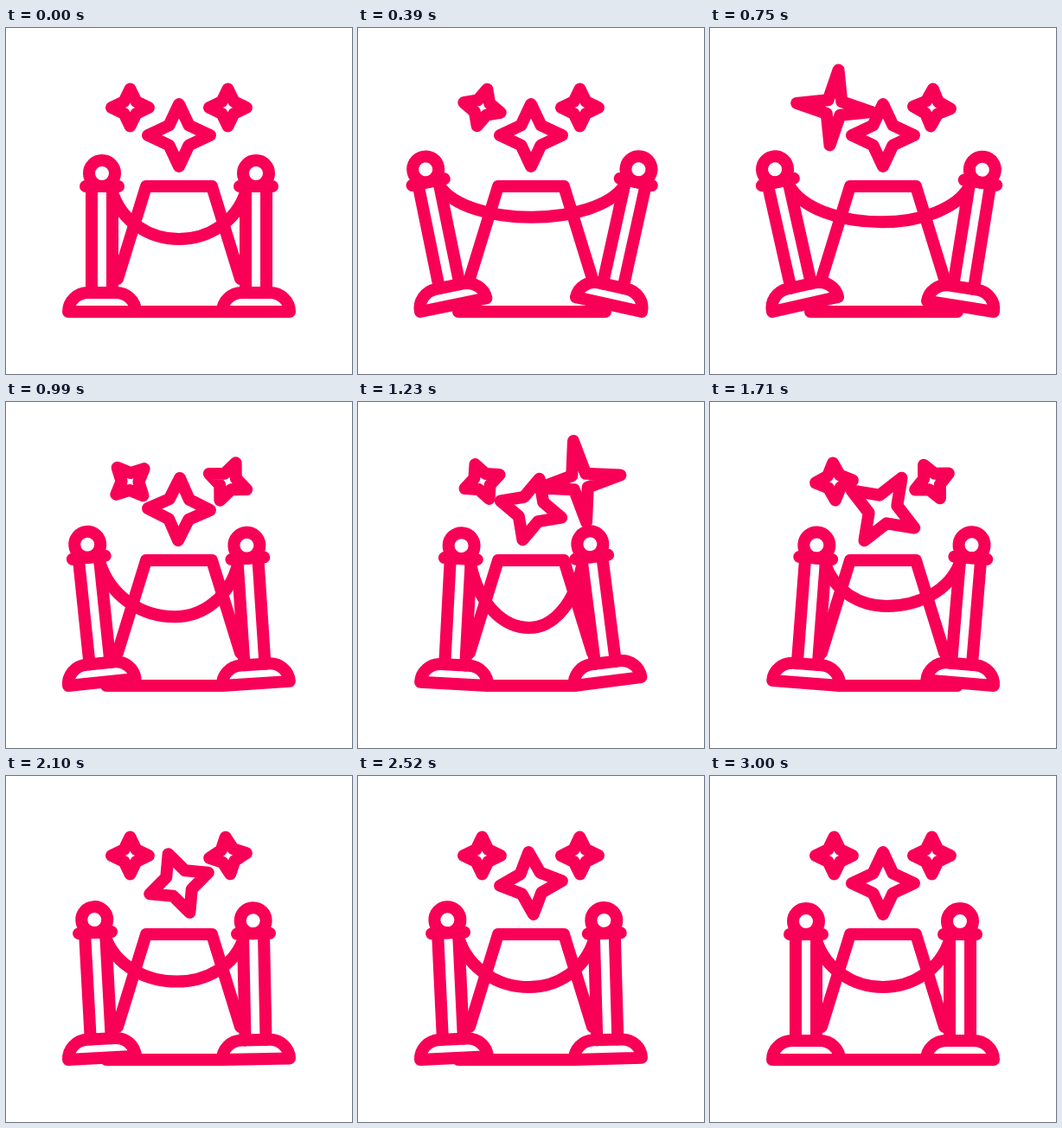
These frames come from a looping animation (400x400 px, 5530 ms). An HTML page with a canvas:

```html
<!DOCTYPE html>
<html lang="en">
<head>
<meta charset="utf-8">
<title>Red carpet</title>
<style>
  html, body { margin: 0; width: 100%; height: 100%; overflow: hidden; background: #fff; }
  canvas { display: block; width: 400px; height: 400px; }
</style>
</head>
<body>
<canvas id="stage" width="400" height="400"></canvas>
<script>
const ctx = document.getElementById('stage').getContext('2d');
const LOOP = 5530, STEP = 30, ACTIVE = 3000;
const SPIN = 2160, FLOOR = 328, MID = 200;

// Cubic bezier easing (0.46, 0, 0.1, 1), solved by bisection.
function ease(x) {
  if (x <= 0) return 0;
  if (x >= 1) return 1;
  let lo = 0, hi = 1;
  for (let i = 0; i < 24; i++) {
    const m = (lo + hi) / 2, n = 1 - m;
    if (3 * n * n * m * 0.46 + 3 * n * m * m * 0.1 + m * m * m < x) lo = m; else hi = m;
  }
  return lo * lo * (3 - 2 * lo);
}

const smooth = u => u * u * (3 - 2 * u);

// Swings out to `size`, then back and forth with shrinking peaks, then rests.
function swing(t, { first, half, peaks, size, decay }) {
  if (t < first) return size * ease(t / first);
  const k = Math.floor((t - first) / half);
  const peak = i => i < peaks ? size * (-decay) ** i : 0;
  return peak(k) + (peak(k + 1) - peak(k)) * smooth((t - first) / half - k);
}

// Tilts are in degrees, clockwise positive; the rope's sag is in pixels.
const leftSwing = { first: 680, half: 775, peaks: 3, size: -13.1, decay: 0.55 };
const rightSwing = { first: 590, half: 560, peaks: 4, size: 13.35, decay: 0.6 };
const ropeSwing = { first: 590, half: 620, peaks: 3, size: -27, decay: 0.63 };

const stars = [
  { x: 143.5, y: 92, r: 21.5, notch: 7, delay: 0 },
  { x: 256.5, y: 92, r: 21.5, notch: 7, delay: 540 },
  { x: 200, y: 124, r: 36, notch: 11.5, delay: 840 }
];

function line(...points) {
  ctx.beginPath();
  points.forEach(([x, y]) => ctx.lineTo(x, y));
  ctx.stroke();
}

// Half a turn, with the tips shooting out midway.
function drawStar({ x, y, r, notch, delay }, time) {
  const t = time - delay;
  const pulse = Math.exp(-(((t - 690) / 150) ** 2));
  const tip = r + 26 * pulse, inner = notch * (1 + 0.15 * pulse) * Math.SQRT2;
  const turn = Math.PI * ease(t / SPIN);
  ctx.beginPath();
  for (let i = 0; i < 8; i++) {
    const a = turn + i * Math.PI / 4, d = i % 2 ? inner : tip;
    ctx.lineTo(x + d * Math.sin(a), y - d * Math.cos(a));
  }
  ctx.closePath();
  ctx.stroke();
}

// A post rocks on whichever bottom corner it leans over.
function rock(cx, degrees) {
  const px = cx + (degrees > 0 ? 39 : -39);
  const a = degrees * Math.PI / 180, c = Math.cos(a), s = Math.sin(a);
  return {
    a, px,
    at: (x, y) => [px + (x - px) * c - (y - FLOOR) * s, FLOOR + (x - px) * s + (y - FLOOR) * c]
  };
}

function drawPost(cx, { a, px }) {
  ctx.save();
  ctx.translate(px, FLOOR);
  ctx.rotate(a);
  ctx.translate(cx - px, -FLOOR);
  ctx.beginPath();
  ctx.arc(0, 168, 15, 0, 2 * Math.PI);
  ctx.stroke();
  line([-19, 183], [19, 183]);
  line([-12, 183], [-12, 306]);
  line([12, 183], [12, 306]);
  ctx.beginPath();
  ctx.moveTo(-39, FLOOR);
  ctx.bezierCurveTo(-39, 316, -29, 306, -16, 306);
  ctx.lineTo(16, 306);
  ctx.bezierCurveTo(29, 306, 39, 316, 39, FLOOR);
  ctx.closePath();
  ctx.stroke();
  ctx.restore();
}

function drawRope([x0, y0], [x1, y1], low) {
  const mid = MID + ((x0 + x1) / 2 - MID) * 0.4;
  const l = mid - x0, r = x1 - mid;
  ctx.beginPath();
  ctx.moveTo(x0, y0);
  ctx.bezierCurveTo(x0 + l * 0.14, y0 + (low - y0) * 0.62, mid - l * 0.45, low, mid, low);
  ctx.bezierCurveTo(mid + r * 0.45, low, x1 - r * 0.14, y1 + (low - y1) * 0.62, x1, y1);
  ctx.stroke();
}

function draw(t) {
  ctx.fillStyle = '#fff';
  ctx.fillRect(0, 0, 400, 400);
  ctx.strokeStyle = '#f80056';
  ctx.lineWidth = 14;
  ctx.lineCap = ctx.lineJoin = 'round';

  const leftTilt = swing(t, leftSwing), rightTilt = swing(t, rightSwing);
  const left = rock(111, leftTilt), right = rock(289, rightTilt);

  line([129, 290], [162, 183], [238, 183], [271, 290]);
  line([leftTilt > 0 ? 150 : 116, FLOOR], [rightTilt < 0 ? 250 : 286, FLOOR]);
  drawRope(left.at(123, 190), right.at(277, 190), 244 + swing(t, ropeSwing));
  drawPost(111, left);
  drawPost(289, right);
  stars.forEach(star => drawStar(star, t));
}

const start = performance.now();
function frame() {
  const t = (performance.now() - start) % LOOP;
  draw(Math.min(ACTIVE, Math.floor(t / STEP) * STEP));
  requestAnimationFrame(frame);
}
frame();
</script>
</body>
</html>
```
